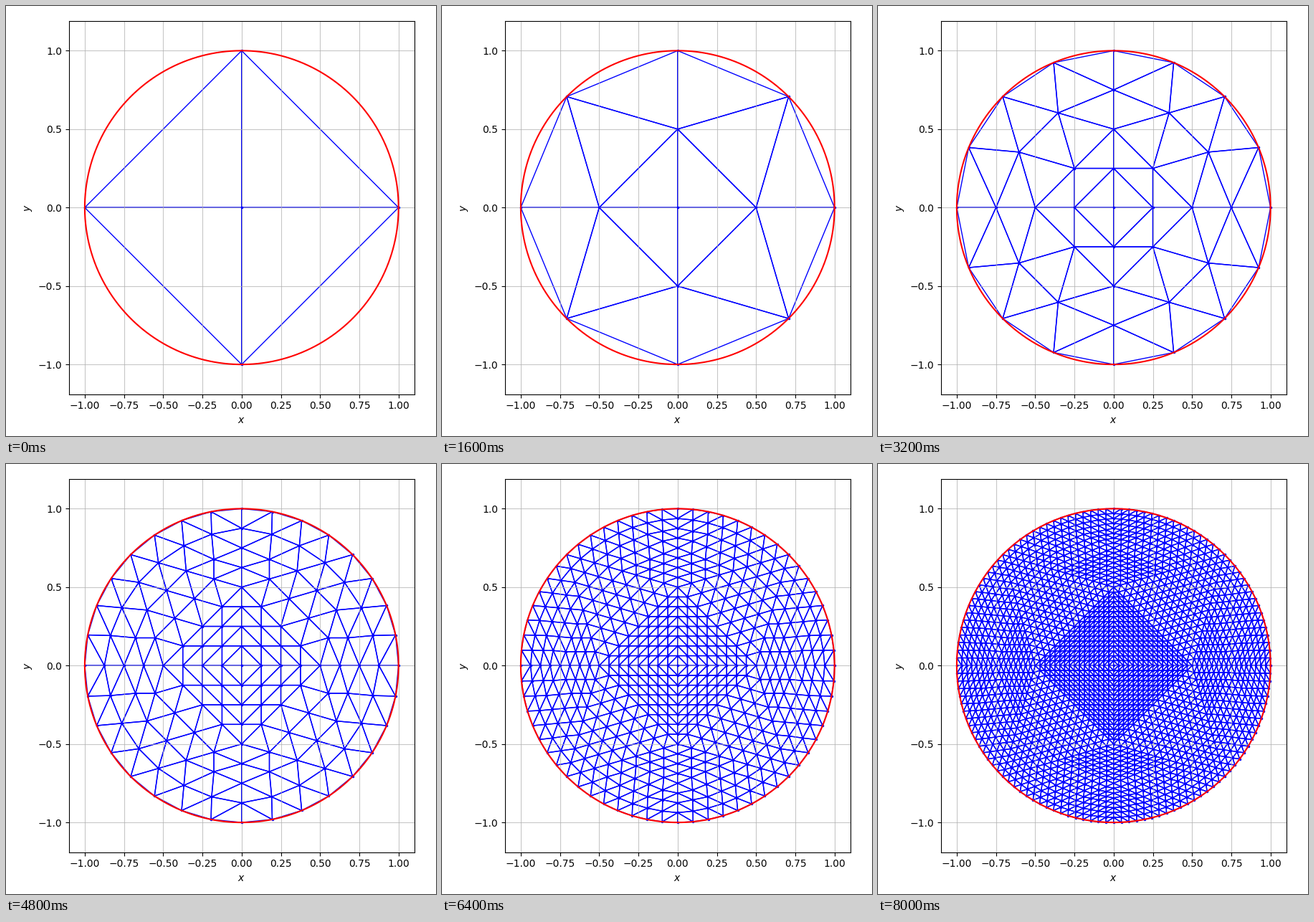
These frames come from a looping animation (600 px wide and 600 px high, 9.6 s). A matplotlib script:

```python
import numpy as np
import matplotlib.pyplot as plt
from matplotlib.animation import FuncAnimation
from matplotlib.collections import PolyCollection

LEVELS = 6
STEP_MS = 1600


def midpoint(a, b):
    """Middle of an edge, pushed out to the circle for rim edges."""
    mid = (a + b) / 2
    on_rim = np.isclose(np.hypot(*a), 1) and np.isclose(np.hypot(*b), 1)
    return mid / np.hypot(*mid) if on_rim else mid


def refine(triangles):
    """Split every triangle into four."""
    result = []
    for a, b, c in triangles:
        ab, bc, ca = midpoint(a, b), midpoint(b, c), midpoint(c, a)
        result += [(a, ab, ca), (ab, b, bc), (ca, bc, c), (ab, bc, ca)]
    return np.array(result)


def build_meshes():
    corners = np.array([(1, 0), (0, 1), (-1, 0), (0, -1)], float)
    mesh = np.array([(np.zeros(2), corners[k], corners[(k + 1) % 4])
                     for k in range(4)])
    meshes = [mesh]
    for _ in range(LEVELS - 1):
        mesh = refine(mesh)
        meshes.append(mesh)
    return meshes


meshes = build_meshes()
nodes = [np.unique(m.reshape(-1, 2).round(9) + 0.0, axis=0) for m in meshes]

fig = plt.figure(figsize=(6, 6), dpi=100)
left, right, top, bottom = 88, 569.6, 20.9, 541.6
ax = fig.add_axes([left / 600, 1 - bottom / 600,
                   (right - left) / 600, (bottom - top) / 600])
half_h = 1.1 * (bottom - top) / (right - left)
ax.set_xlim(-1.1, 1.1)
ax.set_ylim(-half_h, half_h)
ax.set_xticks(np.arange(-1, 1.01, 0.25))
ax.set_yticks(np.arange(-1, 1.01, 0.5))
ax.set_xlabel("$x$")
ax.set_ylabel("$y$")
ax.grid(alpha=0.7)

edges = PolyCollection([], facecolors="none", edgecolors="blue",
                       linewidths=1, zorder=1)
ax.add_collection(edges, autolim=False)
dots, = ax.plot([], [], "b.", markersize=3)
angle = np.linspace(0, 2 * np.pi, 400)
ax.plot(np.cos(angle), np.sin(angle), "r", linewidth=1.5)


def draw(level):
    edges.set_verts(meshes[level])
    dots.set_data(*nodes[level].T)
    return edges, dots


anim = FuncAnimation(fig, draw, frames=LEVELS, interval=STEP_MS,
                     init_func=lambda: draw(0), repeat=True, repeat_delay=0)
plt.show()
```
